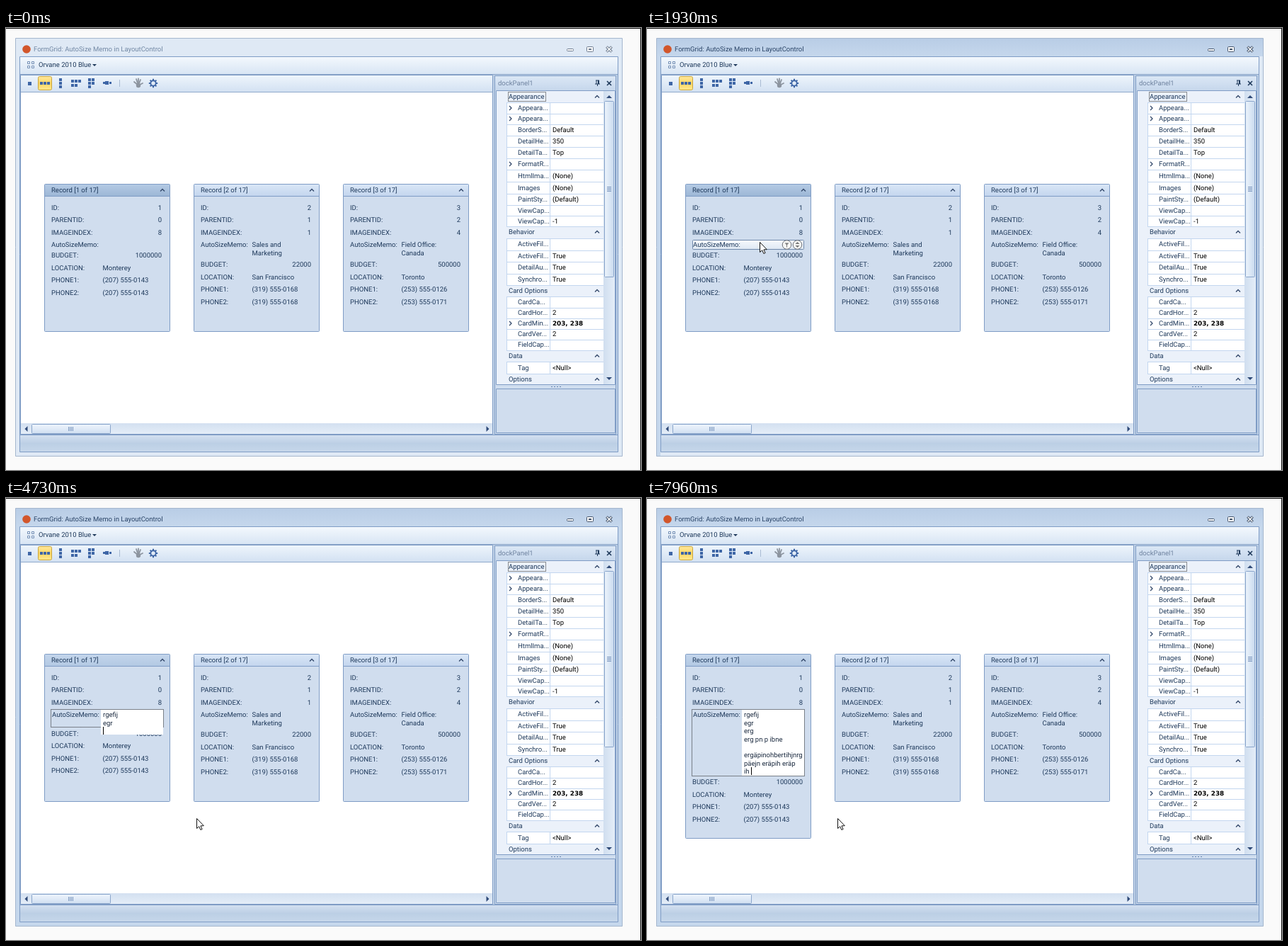
Write an HTML page with a canvas that moves like this. It is 897 by 624 pixels and loops after 8000 ms.

```html
<!DOCTYPE html>
<html lang="en">
<head>
<meta charset="utf-8">
<title>AutoSize Memo</title>
<style>
html, body { margin: 0; width: 100%; height: 100%; overflow: hidden; background: #fafafa; }
canvas { display: block; }
</style>
</head>
<body>
<canvas id="stage" width="897" height="624"></canvas>
<script>
const ctx = document.getElementById('stage').getContext('2d');
const LOOP = 8000, LINE = 11.4;
const INK = '#1e395b', EDGE = '#7f9cc5', ICON = '#3e66a6';

// ---------- drawing helpers ----------
function box(x, y, w, h, fill, stroke, r = 0) {
  ctx.beginPath();
  ctx.roundRect(x + (stroke ? .5 : 0), y + (stroke ? .5 : 0), w - (stroke ? 1 : 0), h - (stroke ? 1 : 0), r);
  if (fill) { ctx.fillStyle = fill; ctx.fill(); }
  if (stroke) { ctx.strokeStyle = stroke; ctx.lineWidth = 1; ctx.stroke(); }
}
function grad(x0, y0, x1, y1, ...colors) {
  const g = ctx.createLinearGradient(x0, y0, x1, y1);
  colors.forEach((c, i) => g.addColorStop(i / (colors.length - 1), c));
  return g;
}
const down = (y, h, ...colors) => grad(0, y, 0, y + h, ...colors);

function text(s, x, y, color = INK, align = 'left', bold = false) {
  ctx.font = bold ? 'bold 8.8px "DejaVu Sans", sans-serif' : '9.5px Roboto, sans-serif';
  ctx.textAlign = align;
  ctx.fillStyle = color;
  ctx.fillText(s, x, y + 3.4);
}
function path(points, stroke, width = 1, fill) {
  ctx.beginPath();
  points.forEach(([x, y]) => ctx.lineTo(x, y));
  if (fill) { ctx.closePath(); ctx.fillStyle = fill; ctx.fill(); }
  if (stroke) { ctx.strokeStyle = stroke; ctx.lineWidth = width; ctx.stroke(); }
}
function disc(x, y, r, fill, stroke, width = 1) {
  ctx.beginPath();
  ctx.arc(x, y, r, 0, 7);
  if (fill) { ctx.fillStyle = fill; ctx.fill(); }
  if (stroke) { ctx.strokeStyle = stroke; ctx.lineWidth = width; ctx.stroke(); }
}
const chevron = (x, y) => path([[x - 3, y + 1.5], [x, y - 1.5], [x + 3, y + 1.5]], '#34496b', 1.4);
const triangle = (x, y, dx, dy) => path([
  [x + dx, y + dy], [x - dx - 2 * dy, y - dy - 2 * dx], [x - dx + 2 * dy, y - dy + 2 * dx]
], null, 0, '#2f4a78');
function cross(x, y, r, color, width) {
  path([[x - r, y - r], [x + r, y + r]], color, width);
  path([[x - r, y + r], [x + r, y - r]], color, width);
}
function dotted(x, y, w, h) {
  ctx.setLineDash([1, 1]);
  box(x, y, w, h, null, '#222');
  ctx.setLineDash([]);
}

// ---------- window ----------
function drawFrame(active, repainted) {
  box(0, 0, 897, 624, '#fafafa');
  box(0, 0, 897, 1, '#111');
  box(896, 0, 1, 624, '#111');
  box(13, 14, 858, 591, repainted ? '#c5d7ec' : '#dfe9f5', '#a5b7ce');
  // the title strip and left side turn active before the other sides
  if (active) {
    box(14, 15, 856, 25, down(15, 25, '#b9cde6', '#c5d7ec'));
    box(14, 40, 5, 564, '#c5d7ec');
  }
  disc(29, 30, 5.8, '#d2562b');
  text('FormGrid: AutoSize Memo in LayoutControl', 39, 30, active ? '#2b4568' : '#7389a5');
  const c = active ? '#44546b' : '#6c7a8e';
  box(792, 29, 10, 4, '#fff', c, 1);
  box(820, 26, 10, 8, '#fff', c, 1);
  box(823, 29, 4, 2, c);
  cross(852, 30, 3.6, c, 3.6);
  cross(852, 30, 3.2, '#fff', 1.4);

  box(19, 40, 846, 559, '#bfd1e7', EDGE);
  box(20, 41, 844, 24, down(41, 24, '#f3f8fd', '#d8e5f4'));
  box(20, 65, 844, 1, '#87a2c6');
  for (const [x, y] of [[30, 47], [36, 47], [30, 53], [36, 53]]) box(x, y, 4, 4, '#e6eef8', '#7590b5');
  text('Orvane 2010 Blue', 46, 52);
  path([[122, 51], [128, 51], [125, 54]], null, 0, INK);
  box(20, 575, 844, 23, down(575, 23, '#d3e0f0', '#bccfe5', '#c6d7ea'));
  box(20, 574, 844, 1, EDGE);
}

function drawToolbar() {
  box(20, 66, 668, 508, '#fff', EDGE);
  box(21, 67, 666, 23, down(67, 23, '#eef5fc', '#d3e1f2'));
  box(21, 90, 666, 1, '#8fa9cc');
  box(45, 68, 20, 20, down(68, 20, '#ffe9a0', '#ffd763', '#ffe98f'), '#c9a53c', 2);
  const dots = (w, ...list) => list.forEach(([x, y]) => box(x, y, w, w, ICON));
  dots(5, [31, 76]);
  dots(4, [48, 76], [53, 76], [58, 76], [75, 71], [75, 76], [75, 81]);
  dots(4, [92, 73], [97, 73], [102, 73], [92, 79], [97, 79]);
  dots(4, [116, 71], [121, 71], [116, 76], [121, 76], [116, 81]);
  dots(5, [140, 75]);
  dots(3, [137, 76], [146, 76]);
  box(160, 73, 1, 10, '#a9bbd3');
  ctx.lineCap = 'round';
  for (const [x, y] of [[181, 76], [184, 72], [187, 71.5], [190, 73], [193, 78]])
    path([[x, y], [187, 81]], '#8c949f', 1.8);
  ctx.lineCap = 'butt';
  disc(187, 81, 3.2, '#8c949f');
  disc(208, 78, 3.7, null, ICON, 1.9);
  for (let i = 0; i < 8; i++) {
    const a = i * Math.PI / 4, u = Math.cos(a), v = Math.sin(a);
    path([[208 + u * 4, 78 + v * 4], [208 + u * 6.2, 78 + v * 6.2]], ICON, 2);
  }
  // horizontal scroll bar
  box(21, 558, 666, 15, down(558, 15, '#d3e0f0', '#e4edf8'));
  triangle(28.5, 566, -2, 0);
  triangle(680.5, 566, 2, 0);
  box(36, 559, 112, 14, down(559, 14, '#f0f6fd', '#cfdef1'), '#8aa5cb', 1);
  for (let x = 88; x < 96; x += 2) box(x, 563, 1, 6, '#7d98bf');
}

// ---------- property panel ----------
// [row centre, name, value, flags]: c = category, + = expandable, b = bold
const PROPS = [
  [97, 'Appearance', '', 'c'], [113, 'Appeara...', '', '+'], [128, 'Appeara...', '', '+'],
  [144, 'BorderS...', 'Default'], [160, 'DetailHe...', '350'], [175.5, 'DetailTa...', 'Top'],
  [192, 'FormatR...', '', '+'], [208.5, 'HtmlIma...', '(None)'], [225.5, 'Images', '(None)'],
  [242, 'PaintSty...', '(Default)'], [257.5, 'ViewCap...', ''], [272.5, 'ViewCap...', '-1'],
  [288, 'Behavior', '', 'c'], [305, 'ActiveFil...', ''], [322, 'ActiveFil...', 'True'],
  [338, 'DetailAu...', 'True'], [355, 'Synchro...', 'True'],
  [371, 'Card Options', '', 'c'], [387, 'CardCa...', ''], [402, 'CardHor...', '2'],
  [417, 'CardMin...', '203, 238', '+b'], [432, 'CardVer...', '2'], [447, 'FieldCap...', ''],
  [463, 'Data', '', 'c'], [479.5, 'Tag', '<Null>'], [496, 'Options', '', 'c']
];

function drawPanel() {
  box(690, 67, 172, 507, '#cfddef', EDGE);
  box(691, 68, 170, 20, down(68, 20, '#dbe7f5', '#c6d7ec'));
  text('dockPanel1', 695, 78, '#6f83a0');
  path([[833, 74], [838, 74]], INK);
  path([[834, 74], [834, 79]], INK);
  path([[837, 74], [837, 79]], INK, 2);
  path([[832, 79], [839, 79]], INK);
  path([[835.5, 79], [835.5, 82]], INK);
  cross(852, 78, 3, INK, 1.6);

  box(692, 88, 169, 416, '#ebf1fa', EDGE);
  PROPS.forEach(([y, name, value, flags = ''], i) => {
    const top = i ? Math.round((y + PROPS[i - 1][0]) / 2) : 89;
    const end = i < PROPS.length - 1 ? Math.round((y + PROPS[i + 1][0]) / 2) : 503;
    if (flags.includes('c')) {
      text(name, 710, y);
      chevron(835, y);
      return;
    }
    box(707, top, 137, end - top, '#fff');
    box(707, top, 137, 1, '#c3d6ef');
    box(707, end, 137, 1, '#c3d6ef');
    box(707, top, 1, end - top, '#c3d6ef');
    box(768, top, 1, end - top, '#c3d6ef');
    text(name, 723, y);
    text(value, 772, y, '#000', 'left', flags.includes('b'));
    if (flags.includes('+')) path([[711, y - 3], [714, y], [711, y + 3]], '#34496b', 1.3);
  });
  dotted(709, 90, 54, 14);

  // vertical scroll bar
  box(844, 89, 16, 414, grad(844, 0, 860, 0, '#d0deef', '#e4edf8'));
  triangle(852, 97, 0, -2);
  triangle(852, 495, 0, 2);
  box(845, 103, 14, 249, grad(845, 0, 859, 0, '#eef5fc', '#c9daef'), '#8aa5cb', 1);
  for (let y = 224; y < 232; y += 2) box(849, y, 6, 1, '#7d98bf');
  for (let x = 770; x < 783; x += 4) box(x, 506, 2, 1, '#5f7fab');
  box(692, 509, 169, 63, '#d0ddee', EDGE);
}

// ---------- cards ----------
const LABELS = ['ID', 'PARENTID', 'IMAGEINDEX', 'AutoSizeMemo', 'BUDGET', 'LOCATION', 'PHONE1', 'PHONE2'];
const ROW_Y = [253.5, 271, 288.5, 306, 321, 338.5, 356, 373.5];
const CARDS = [
  { x: 54, data: ['1', '0', '8', '', '1000000', 'Monterey', '(207) 555-0143', '(207) 555-0143'] },
  { x: 265, data: ['2', '1', '1', 'Sales and\nMarketing', '22000', 'San Francisco', '(319) 555-0168', '(319) 555-0168'] },
  { x: 476, data: ['3', '2', '4', 'Field Office:\nCanada', '500000', 'Toronto', '(253) 555-0126', '(253) 555-0171'] }
];
const isNumber = i => i < 3 || i === 4;
const rowY = (i, shift) => ROW_Y[i] + (i > 3 ? shift : 0);

function drawHover(x, y, small) {
  const h = small ? 14 : 16, top = Math.round(y - h / 2);
  box(x + 10, top, 158, h, down(top, h, '#f8fafd', '#dde7f3'), '#7089ab', 1);
}
function drawHoverButtons(x, y) {
  for (const dx of [143.5, 158.5]) disc(x + dx, y, 6.3, '#f6f6f4', '#6b6f76');
  path([[x + 140.5, y - 2.5], [x + 146.5, y - 2.5], [x + 143.5, y + .5]], null, 0, '#777');
  path([[x + 143.5, y], [x + 143.5, y + 3.5]], '#777');
  for (const s of [-1, 1])
    path([[x + 155.5, y + s], [x + 161.5, y + s], [x + 158.5, y + s * 4]], null, 0, '#777');
}

function drawCard({ x, data }, index, shift, height, hover, focused, editing) {
  const header = index ? ['#d9e6f6', '#c4d6ee'] : focused ? ['#c3d5eb', '#b3c9e3'] : ['#b4cae4', '#9db7d6'];
  box(x, 220, 178, height, '#d0ddee', EDGE, 1);
  box(x + 1, 221, 176, 16, down(221, 16, ...header));
  box(x, 237, 178, 1, EDGE);
  text(`Record [${index + 1} of 17]`, x + 10, 229);
  chevron(x + 167, 229);
  LABELS.forEach((label, i) => {
    const y = rowY(i, shift), on = hover === i;
    if (on) drawHover(x, y, i === 3);
    text(label + ':', x + (on || (editing && i === 3) ? 11 : 10), y);
    if (isNumber(i)) text(data[i], x + 166, y, INK, 'right');
    else data[i].split('\n').forEach((s, k) => text(s, x + 82.5, y + k * LINE));
    if (on) drawHoverButtons(x, y);
  });
}

// ---------- typing ----------
// [first key, last key, characters]
const KEYS = [
  [3800, 4000, 'rgefij'], [4360, 4360, '\n'], [4600, 4680, 'egr'], [4730, 4730, '\n'],
  [4830, 4900, 'erg'], [4960, 4960, '\n'], [5200, 5730, 'erg pn p ibn'], [5900, 5900, 'e'],
  [6160, 6160, '\n'], [6400, 6400, '\n'], [6560, 6560, 'e'], [6700, 6800, 'rgäpinoh'],
  [6830, 7330, 'bertihjnrg'], [7360, 7360, '\np'], [7500, 7930, 'äejn eräpih eräp\nih'], [7960, 7960, ' ']
];
const GROWTH = [4430, 4800, 5030, 6160, 6430, 7360, 7900];
const ACTIVATE = 1930, FOCUS = 1960, EDIT = 2000;

function typed(t) {
  let value = '', last = 2030;
  for (const [start, end, chars] of KEYS)
    [...chars].forEach((c, i) => {
      const at = start + (end - start) * i / Math.max(1, chars.length - 1);
      if (at <= t) { value += c; last = at; }
    });
  return { lines: value.split('\n'), last };
}

function drawEditor(t, rows) {
  const { lines, last } = typed(t);
  const h = Math.round(14 + (rows - 1) * LINE);
  dotted(63, 298, 160, h + 1);
  box(134, 299, 88, Math.max(h - 1, Math.round(lines.length * LINE + 1)), '#fff');
  lines.forEach((s, i) => text(s, 137, 306 + i * LINE, '#1c2b40'));
  if (Math.floor((t - last) / 530) % 2 === 0) {
    const n = lines.length - 1;
    box(Math.round(137 + ctx.measureText(lines[n]).width), Math.round(300 + n * LINE), 1, 11, '#000');
  }
}

// ---------- mouse ----------
const MOVES = [
  [630, 749, 496], [1330, 130, 291], [1420, 130, 291], [1560, 159, 302], [2190, 159, 302],
  [2360, 163, 335], [2790, 163, 335], [2900, 157, 376], [2930, 157, 376], [3130, 269, 452]
];
const HOVER_LAG = 70;

function mouse(t) {
  if (t < MOVES[0][0]) return null;
  const k = MOVES.findIndex(m => m[0] > t);
  if (k < 0) return MOVES[MOVES.length - 1].slice(1);
  const [t0, x0, y0] = MOVES[k - 1], [t1, x1, y1] = MOVES[k];
  const u = (t - t0) / (t1 - t0), e = u * u * (3 - 2 * u);
  return [x0 + (x1 - x0) * e, y0 + (y1 - y0) * e];
}
function drawCursor([x, y]) {
  x = Math.round(x) + .5;
  y = Math.round(y) + .5;
  const shape = [[0, 0], [0, 14], [3.2, 11.2], [5.4, 16], [7.6, 15], [5.4, 10.4], [9.8, 10.2]];
  const arrow = shape.map(([a, b]) => [x + a, y + b]);
  path([...arrow, arrow[0]], '#111', 1, '#fff');
}
function hoverRow(point, x, shift) {
  if (!point || point[0] < x + 10 || point[0] > x + 168) return -1;
  return ROW_Y.findIndex((_, i) => Math.abs(point[1] - rowY(i, shift)) < (i === 3 ? 7 : 8));
}

function render(t) {
  ctx.textRendering = 'geometricPrecision';
  drawFrame(t >= ACTIVATE, t >= FOCUS);
  drawToolbar();
  drawPanel();
  const editing = t >= EDIT;
  const rows = 1 + GROWTH.filter(g => g <= t).length;
  const trail = mouse(t - HOVER_LAG);
  CARDS.forEach((card, i) => {
    const shift = i ? 13 : (rows - 1) * LINE;
    const height = i ? 209 : Math.max(209, Math.round(215.2 + (rows - 4) * LINE));
    let hover = hoverRow(trail, card.x, shift);
    if (editing && !i && hover === 3) hover = -1;
    drawCard(card, i, shift, height, hover, t >= FOCUS, editing && !i);
  });
  if (editing) drawEditor(t, rows);
  const point = mouse(t);
  if (point) drawCursor(point);
}

function tick() {
  render(performance.now() % LOOP);
  requestAnimationFrame(tick);
}
tick();
</script>
</body>
</html>
```
